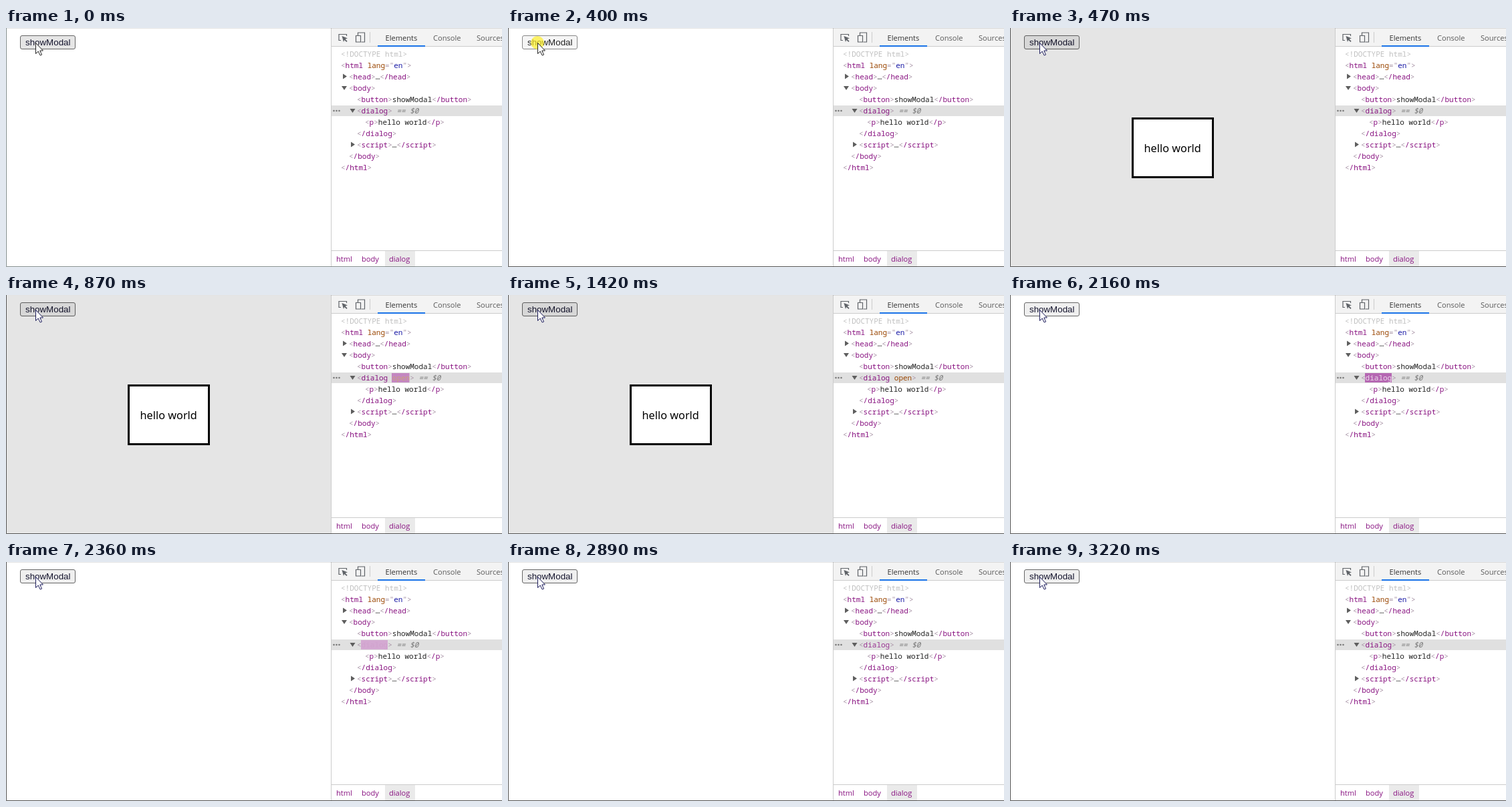
An HTML page for the animation above (3.28 s loop, 742 by 358 pixels).

```html
<!DOCTYPE html>
<html lang="en">
<head>
<meta charset="utf-8">
<style>
  html, body { margin: 0; width: 100%; height: 100%; overflow: hidden; background: #fff; }
  svg { display: block; }
  text { white-space: pre; }
  .ui { font: 11.1px "Open Sans", sans-serif; fill: #5a5a5a; }
  .code { font: 11px "Noto Sans Mono", monospace; fill: #a894a6; }
  .name { fill: #881280; }
  .attr { fill: #994500; }
  .value { fill: #1a1aa6; }
  .plain { fill: #222; }
  .doctype { fill: #c0c0c0; }
  .hint { fill: #777; font-style: italic; }
  .line { fill: none; stroke: #5f6368; stroke-width: 1.2; }
</style>
</head>
<body>
<svg width="742" height="358" viewBox="0 0 742 358">
  <!-- page -->
  <rect width="742" height="358" fill="#fff"/>
  <rect id="button" x="21.5" y="11.5" width="82" height="20" rx="2.5"/>
  <text id="label" x="29" y="26" font-family="Liberation Sans, Arial, sans-serif" font-size="13.333">showModal</text>
  <g id="modal">
    <rect x="1" y="1" width="485" height="356" fill="#000" opacity=".1"/>
    <rect x="183.5" y="135.5" width="120" height="88" fill="#fff" stroke="#000" stroke-width="3"/>
    <text x="200.5" y="186" font-family="Noto Sans, sans-serif" font-size="16.3">hello world</text>
  </g>
  <circle id="click" cx="44" cy="22" r="10" fill="#fff02a" opacity=".7"/>
  <path id="cursor" d="M44.5 22.5V38.5L48.2 35L51.2 41L53.6 40L50.8 34H55.5Z" fill="#fff"/>

  <!-- developer tools -->
  <rect x="486" width="256" height="358" fill="#fff"/>
  <rect x="487" width="255" height="27" fill="#f3f3f3"/>
  <path d="M486.5 0V357M487 27.5H742M487 333.5H742M544.5 6V22" stroke="#ccc"/>
  <path class="line" d="M501 18.5H498V9.5H509.5V12"/>
  <path d="M502.5 12L511 15.4L507.6 16.6L510.6 19.8L509.4 21L506.2 17.9L505 21Z" fill="#5f6368"/>
  <path class="line" d="M526.5 11V7H536.5V21H531.5M523.5 11.5H530.5V21H523.5Z"/>
  <g class="ui">
    <text x="567.5" y="19" style="fill:#333">Elements</text>
    <text x="639" y="19">Console</text>
    <text x="704" y="19">Sources</text>
  </g>
  <rect x="556" y="26" width="71" height="2" fill="#1a73e8"/>
  <rect x="567" y="334" width="45" height="23" fill="#eaeaea"/>
  <g class="ui">
    <text class="name" x="494" y="350">html</text>
    <text class="name" x="532" y="350">body</text>
    <text class="name" x="573" y="350">dialog</text>
  </g>
  <rect x="487" y="116" width="255" height="16" fill="#e0e0e0"/>
  <path d="M490.5 124h0m4 0h0m4 0h0" stroke="#777" stroke-width="2.6" stroke-linecap="round"/>
  <path d="M504 68.5L510 72.5L504 76.5ZM516 170.5L522 174.5L516 178.5ZM502 87H510L506 93ZM514.5 121H522.5L518.5 127Z" fill="#5e5e5e"/>
  <g id="tree" class="code"></g>
  <g class="code">
    <rect id="tagFlash" x="531" y="117" width="40" height="14"/>
    <rect id="attrFlash" x="577" y="117" width="26.5" height="14"/>
    <text x="525" y="128">&lt;<tspan id="tagName">dialog</tspan></text>
    <text id="attrName" x="577.8" y="128">open</text>
    <text id="tail" x="571.2" y="128">&gt;<tspan class="hint"> == $0</tspan></text>
  </g>

  <path id="frame" d="M.5 0V357.5H742" fill="none"/>
  <path d="M1 .5H742" stroke="#000" opacity=".1"/>
</svg>
<script>
const LOOP = 3280;
const CLICK = 400, SHOW = 470, ADD_ATTR = 540, CLOSE = 1950, DROP_ATTR = 2020;
// Screen refreshes: the picture holds between these times.
const TICKS = [0, CLICK, SHOW, ADD_ATTR, 610, 670, 740, 870, 1000, 1210, 1280, 1350, 1420,
  CLOSE, DROP_ATTR, 2090, 2150, 2220, 2360, 2430, 2490, 2620, 2890, 2960, 3030, 3150, 3220];
const FLASH = [158, 54, 153], PALE = [233, 215, 233], WHITE = [255, 255, 255];
const NAME = [136, 18, 128], ATTR = [153, 69, 0];

const $ = id => document.getElementById(id);
const span = (kind, text) => `<tspan class="${kind}">${text}</tspan>`;
const tag = (name, attrs = '') => `&lt;${span('name', name)}${attrs}&gt;`;
const pair = (name, text) => tag(name) + span('plain', text) + tag('/' + name);

const rows = [
  [501, span('doctype', '&lt;!DOCTYPE html&gt;')],
  [501, tag('html', ` ${span('attr', 'lang')}="${span('value', 'en')}"`)],
  [513, pair('head', '…')],
  [513, tag('body')],
  [525, pair('button', 'showModal')],
  [525, ''],
  [537, pair('p', 'hello world')],
  [525, tag('/dialog')],
  [525, pair('script', '…')],
  [513, tag('/body')],
  [501, tag('/html')]
];
$('tree').innerHTML = rows.map(([x, html], i) =>
  `<text x="${x}" y="${43 + 17 * i}">${html}</text>`).join('');

const set = (id, attrs) => {
  for (const key in attrs) $(id).setAttribute(key, attrs[key]);
};
const show = (id, on) => set(id, { display: on ? 'inline' : 'none' });
const mix = (a, b, p) => `rgb(${a.map((v, i) => v + (b[i] - v) * p)})`;
const easeOut = x => 1 - (1 - Math.min(1, Math.max(0, x))) ** 1.5;

function flash(box, label, age, boxTime, textTime, color) {
  const active = age >= 0;
  show(box, active && age < boxTime);
  set(box, { fill: mix(FLASH, PALE, easeOut(age / boxTime)) });
  set(label, { fill: active ? mix(WHITE, color, easeOut(age / textTime)) : mix(color, color, 0) });
}

function draw(now) {
  const time = now % LOOP;
  const t = TICKS.findLast(tick => tick <= time);
  const hover = t < CLICK, pressed = t >= CLICK && t < SHOW;
  const open = t >= ADD_ATTR && t < DROP_ATTR;

  set('button', {
    fill: hover ? '#e5e5e5' : pressed ? '#f5f5f5' : '#efefef',
    stroke: pressed ? '#888' : '#666'
  });
  set('label', { fill: pressed ? '#222' : '#15152e' });
  set('cursor', { stroke: hover || pressed ? '#222' : '#1c1c5c' });
  set('frame', { stroke: hover ? '#848e8e' : '#555' });
  show('click', pressed);
  show('modal', t >= SHOW && t < CLOSE);

  flash('attrFlash', 'attrName', open ? t - ADD_ATTR : -1, 880, 880, ATTR);
  flash('tagFlash', 'tagName', t - DROP_ATTR, 600, 1200, NAME);
  show('attrName', open);
  set('tail', { x: open ? 604.2 : 571.2 });
}

const start = performance.now();
function loop() {
  draw(performance.now() - start);
  requestAnimationFrame(loop);
}
loop();
</script>
</body>
</html>
```
